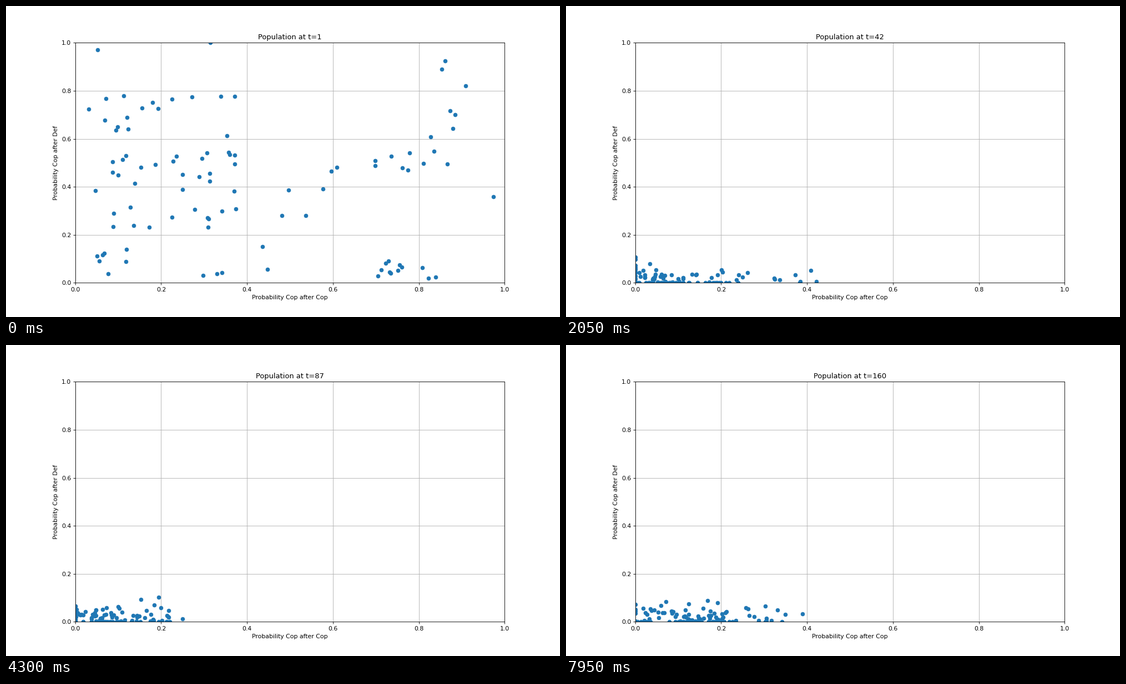
Recreate the animation shown at these times as a matplotlib script. Size 998x561 px, loop 8 s.

```python
import matplotlib.pyplot as plt
import numpy as np
from matplotlib.animation import FuncAnimation

FRAMES, STEP = 160, 50
MUTATION = (.033, .024)
rng = np.random.default_rng(12)

# Families of the first generation: x range, y range, members.
FAMILIES = [
    ((.03, .39), (.60, .79), 16),
    ((.04, .39), (.37, .55), 23),
    ((.06, .42), (.22, .32), 12),
    ((.05, .14), (.03, .15), 7),
    ((.29, .50), (.03, .16), 5),
    ((.48, .62), (.26, .52), 6),
    ((.69, .84), (.02, .10), 12),
    ((.69, .90), (.45, .61), 10),
    ((.85, .91), (.64, .94), 6),
]
LONERS = [(.052, .971), (.315, 1), (.974, .358)]


def first_generation():
    groups = [np.column_stack([rng.uniform(*xs, n), rng.uniform(*ys, n)])
              for xs, ys, n in FAMILIES]
    return np.vstack([LONERS, *groups])


def goal(t):
    """Mean strategy that selection favours in generation t."""
    x = np.interp(t, [0, 16, 27, 56, 113, 134, 159],
                  [.36, .15, .13, .075, .09, .09, .14])
    y = np.interp(t, [0, 16], [.42, .008])
    return np.array([x, y])


def next_generation(parents, t):
    """Pick fitter parents, then mutate their children."""
    gap = parents.mean(0) - goal(t)
    pressure = .6 * gap / (parents.var(0) + 1e-4)
    fitness = np.exp(-(parents - parents.mean(0)) @ pressure)
    picks = rng.choice(len(parents), len(parents), p=fitness / fitness.sum())
    return np.clip(parents[picks] + rng.normal(0, MUTATION, parents.shape), 0, 1)


people = [first_generation()]
for t in range(1, FRAMES):
    people.append(next_generation(people[-1], t))

fig, ax = plt.subplots(figsize=(12.795, 7.1925), dpi=78)  # 998 x 561
fig.subplots_adjust(top=.8815)
ax.set(xlim=(0, 1), ylim=(0, 1),
       xlabel="Probability Cop after Cop", ylabel="Probability Cop after Def")
ax.grid(True)
dots, = ax.plot([], [], "o", color="#1f77b4")
title = ax.set_title("")


def draw(t):
    dots.set_data(*people[t].T)
    title.set_text(f"Population at t={t + 1}")
    return dots, title


anim = FuncAnimation(fig, draw, frames=FRAMES, interval=STEP, repeat=True)
plt.show()
```
